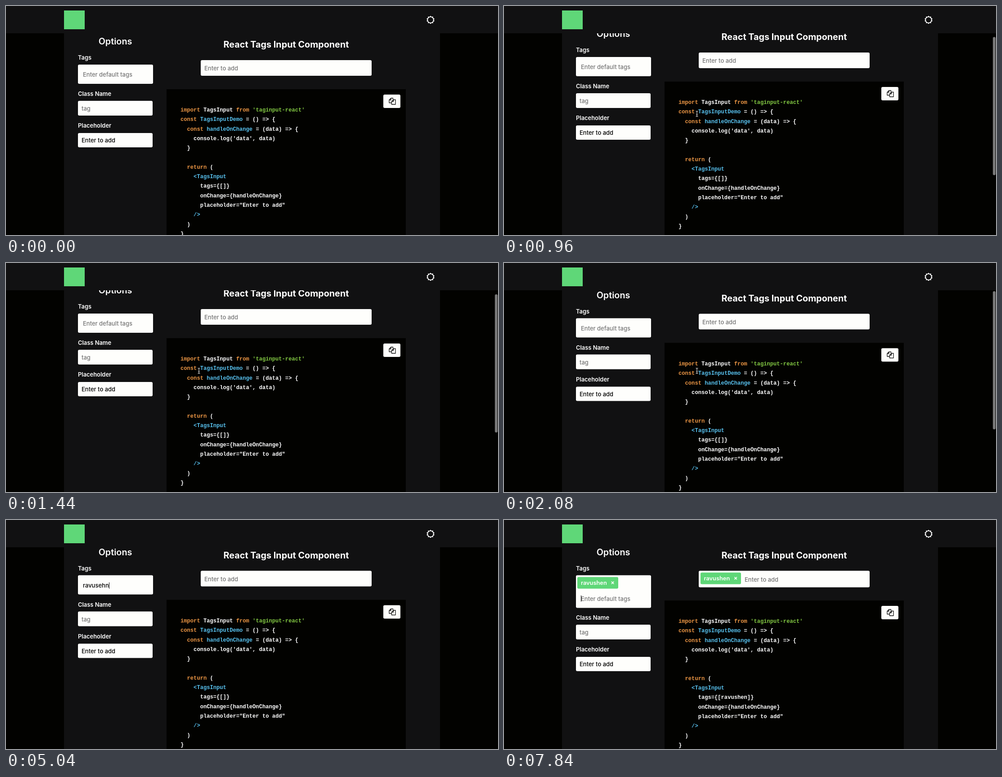
These frames come from a looping animation (1094 px wide and 512 px high, 8000 ms). An HTML page:

```html
<!DOCTYPE html>
<html lang="en">
<head>
<meta charset="utf-8">
<title>React Tags Input Component</title>
<style>
  html, body { margin: 0; width: 100%; height: 100%; overflow: hidden; background: #020200; }
  #stage { position: relative; width: 1094px; height: 512px; overflow: hidden; background: #020200;
    font: 500 13px/20px Inter, "Open Sans", sans-serif; color: #fff; }
  #stage div, #stage svg, pre { position: absolute; margin: 0; white-space: pre; }
  #panel { left: 129px; top: 61px; width: 836px; height: 451px; background: #111112; }
  #header { left: 0; top: 0; width: 1094px; height: 61px; background: #111112; }
  #logo { left: 129px; top: 10px; width: 46px; height: 42px; background: #5fd778; }
  #page, #lower, #main { left: 0; top: 0; }
  .title { font-weight: 700; font-size: 19.8px; transform: translateX(-50%); }
  .label { left: 160px; font-weight: 600; font-size: 12.9px; }
  .box { background: #fefefc; border-radius: 3px; }
  .hint { color: #757575; }
  .dark { color: #000; }
  .tag { width: 90.5px; height: 26px; border-radius: 3px; background: #5fd778;
    font-weight: 600; font-size: 12.8px; line-height: 26px; text-indent: 8px; }
  .tag i { position: absolute; left: 74px; top: -.5px; width: 9px; text-indent: 0;
    text-align: center; font-style: normal; font-weight: 700; }
  #caret { display: inline-block; width: 1px; height: 14px; margin-right: -1px;
    vertical-align: -2.5px; background: #000; }
  #code { left: 357px; top: 186px; width: 532px; height: 400px; background: #020200; }
  pre { left: 31px; top: 37px; font: 700 12.14px/21.3px "Liberation Mono", "Courier New", monospace; }
  .k { color: #ec9644; }
  .n { color: #58c1ee; }
  .s { color: #83c943; }
  #thumb { left: 1087px; top: 58px; width: 5.5px; height: 309px; border-radius: 3px; background: #777; }
  #mouse { left: 0; top: 0; overflow: visible; }
</style>
</head>
<body>
<div id="stage">
  <div id="panel"></div>
  <div id="page">
    <div class="title" style="left:243px;top:69px;font-weight:600">Options</div>
    <div class="label" style="top:106px">Tags</div>
    <div class="box" id="tagsBox" style="left:159.5px;top:131px;width:167px;height:43px"></div>
    <div class="tag" style="left:163px;top:134.5px"><span class="name"></span><i>×</i></div>
    <div id="entry" class="dark" style="left:171px;top:143px"><span id="typed"></span><span id="caret"></span><span id="hint" class="hint">Enter default tags</span></div>
    <div id="lower">
      <div class="label" style="top:186.5px">Class Name</div>
      <div class="box" style="left:160px;top:212px;width:166px;height:33px"></div>
      <div class="hint" style="left:168px;top:218.5px">tag</div>
      <div class="label" style="top:258px">Placeholder</div>
      <div class="box" style="left:160px;top:283.5px;width:166px;height:32.5px"></div>
      <div class="dark" style="left:168px;top:289.5px">Enter to add</div>
    </div>
    <div class="title" style="left:623px;top:75.5px">React Tags Input Component</div>
    <div class="box" id="mainBox" style="left:433px;top:121px;width:380px;height:35px"></div>
    <div class="tag" style="left:436.5px;top:124.5px"><span class="name"></span><i>×</i></div>
    <div class="hint" id="mainHint" style="left:441px;top:129px">Enter to add</div>
    <div id="main">
      <div id="code"><pre><span class="k">import</span> TagsInput <span class="k">from</span> <span class="s">'taginput-react'</span>
<span class="k">const</span> <span class="n">TagsInputDemo</span> = () =&gt; {
  <span class="k">const</span> <span class="n">handleOnChange</span> = (data) =&gt; {
    console.log('data', data)
  }

  <span class="k">return</span> (
    <span class="n">&lt;TagsInput</span>
      tags={[<span id="value"></span>]}
      onChange={handleOnChange}
      placeholder="Enter to add"
    <span class="n">/&gt;</span>
  )
}</pre></div>
      <div class="box" style="left:839px;top:198px;width:38px;height:30px">
        <svg style="left:11.5px;top:7px" width="16" height="16" fill="none" stroke="#111" stroke-width="1.3" stroke-linejoin="round">
          <path d="M6 11.5H1V5L5 1H9.5V4.5M5 1V5H1"/>
          <path d="M6.5 8.5L10.5 4.5H15V15H6.5ZM10.5 4.5V8.5H6.5"/>
        </svg>
      </div>
    </div>
  </div>
  <div id="header">
    <div id="logo"></div>
    <svg style="left:934px;top:21px" width="20" height="20">
      <path id="sun" fill="#fff"/><circle cx="10" cy="10" r="5.9" fill="#111112"/>
    </svg>
  </div>
  <div id="thumb"></div>
  <svg id="mouse" width="1" height="1">
    <path id="arrow" d="M0 0V13L3 10.2L5 14.5L7 13.6L5.1 9.4H9.2Z" fill="#000" stroke="#fff"/>
    <path id="beam" d="M-2.5 -6Q0 -6 0 -4.5Q0 -6 2.5 -6M0 -4.5V4.5M-2.5 6Q0 6 0 4.5Q0 6 2.5 6M-1.5 1.5H1.5" fill="none" stroke-width="1.2"/>
  </svg>
</div>
<script>
const LOOP = 8000, TICK = 40, COMMIT = 7120;
const NAME = 'ravushen', TYPO = 'ravusehn';
const $ = id => document.getElementById(id);
const tags = document.querySelectorAll('.tag');
document.querySelectorAll('.name').forEach(e => e.textContent = NAME);

const smooth = p => p * p * (3 - 2 * p);

// Value at time t along rows of [time, value]
function track(rows, t, ease = p => p) {
  if (t <= rows[0][0]) return rows[0][1];
  for (let i = 1; i < rows.length; i++) {
    const [t0, a] = rows[i - 1], [t1, b] = rows[i];
    if (t <= t1) return a + (b - a) * ease((t - t0) / (t1 - t0));
  }
  return rows[rows.length - 1][1];
}

// Last row that has started
const latest = (rows, t) => rows.reduce((v, r) => t >= r[0] ? r[1] : v, rows[0][1]);

const scroll = [[760, 0], [800, 1.5], [960, 17], [1080, 24], [1160, 26.5], [1360, 26.5], [1440, 18], [1520, 11], [1600, 7.5]];
const mouseX = [[120, 0], [440, 429], [2080, 429], [2840, 218]];
const mouseY = [[120, 0], [440, 241], [2080, 241], [2840, 149]];
const caretOn = [[0, 0], [2920, 1], [3400, 0], [3840, 1], [4320, 0], [4560, 1], [6840, 0], [7800, 1]];
const typing = [[0, ''],
  ...[4560, 4720, 4800, 4840, 4920, 4960, 5000, 5040].map((t, i) => [t, TYPO.slice(0, i + 1)]),
  ...[5560, 5680, 5840].map((t, i) => [t, TYPO.slice(0, 7 - i)]),
  ...[6040, 6240, 6440].map((t, i) => [t, NAME.slice(0, 6 + i)]),
  [COMMIT, '']];

const points = [];
for (let i = 0; i < 20; i++) {
  const r = i % 2 ? 7.3 : 9.3, a = i * Math.PI / 10;
  points.push((10 + r * Math.sin(a)).toFixed(2) + ' ' + (10 - r * Math.cos(a)).toFixed(2));
}
$('sun').setAttribute('d', 'M' + points.join('L') + 'Z');

function drawMouse(t) {
  const x = track(mouseX, t, smooth), y = track(mouseY, t, smooth);
  const inField = x > 160 && x < 327 && y > 123 && y < 166;
  const overText = inField || (x > 357 && y > 180);
  $('mouse').style.display = t >= 160 && t < 4560 ? '' : 'none';
  $('mouse').style.transform = `translate(${x}px, ${y}px)`;
  $('arrow').style.display = overText ? 'none' : '';
  $('beam').style.display = overText ? '' : 'none';
  $('beam').setAttribute('stroke', inField ? '#8a92a5' : '#ddd');
}

function draw(t) {
  const offset = track(scroll, t), done = t >= COMMIT, text = latest(typing, t);
  $('page').style.transform = `translateY(${-offset}px)`;
  $('thumb').style.transform = `translateY(${offset * .66}px)`;
  $('thumb').style.opacity = t < 800 ? 0 : track([[2080, 1], [2320, 0]], t);

  $('typed').textContent = text;
  $('hint').style.display = text ? 'none' : '';
  $('caret').style.opacity = latest(caretOn, t);

  tags.forEach(e => e.style.display = done ? '' : 'none');
  $('value').textContent = done ? NAME : '';
  $('tagsBox').style.height = done ? '72.5px' : '43px';
  $('entry').style.top = done ? '172.5px' : '143px';
  $('lower').style.transform = `translateY(${done ? 29.5 : 0}px)`;
  $('mainBox').style.height = done ? '37px' : '35px';
  $('mainHint').style.left = done ? '535px' : '441px';
  $('mainHint').style.top = done ? '129.5px' : '129px';
  $('main').style.transform = `translateY(${done ? 1.5 : 0}px)`;
  drawMouse(t);
}

const start = performance.now();
function loop() {
  const t = (performance.now() - start) % LOOP;
  draw(Math.floor(t / TICK) * TICK);
  requestAnimationFrame(loop);
}
loop();
</script>
</body>
</html>
```
